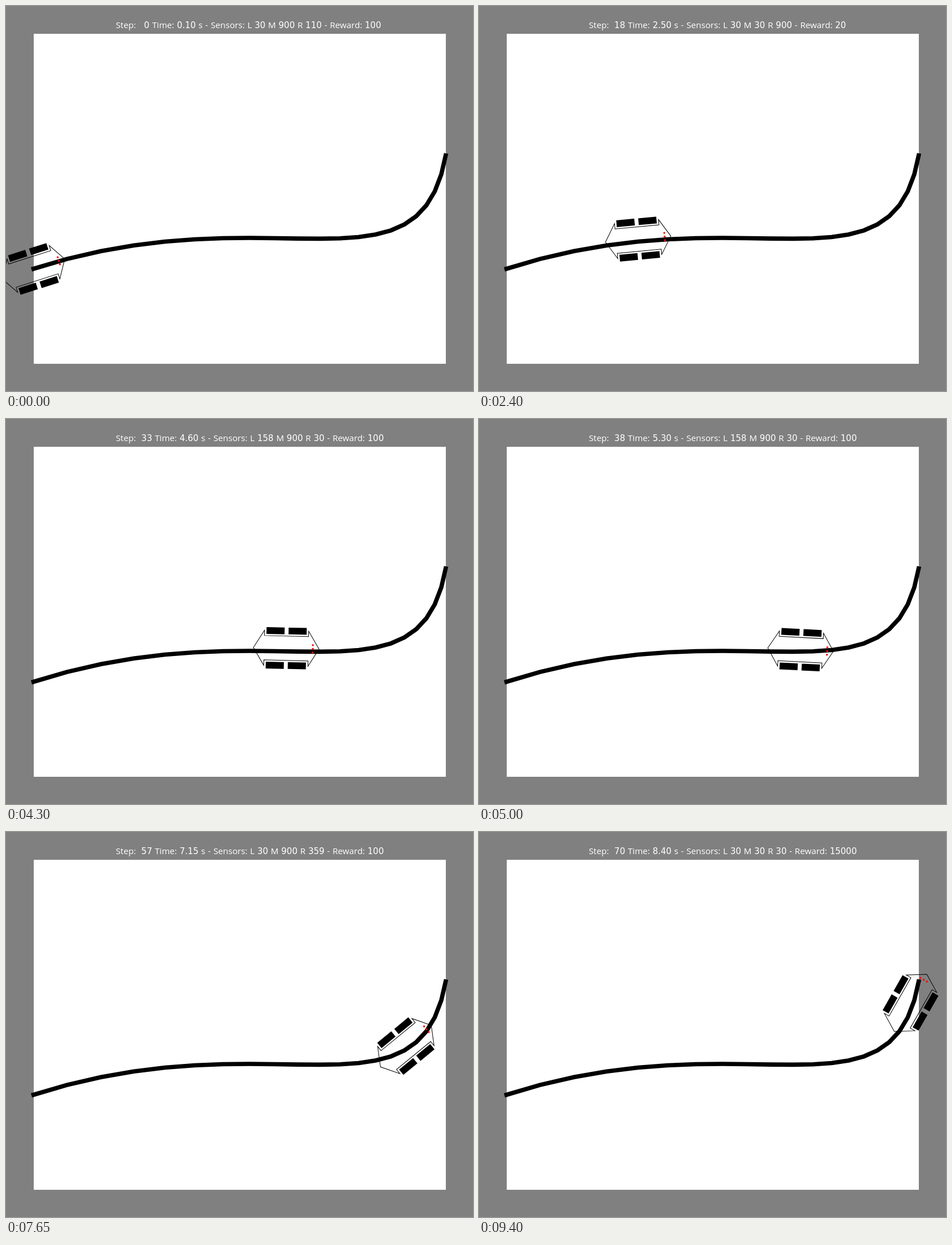
Animation, 825 px wide and 679 px high, one loop 9550 ms. Source, as an HTML page with a canvas:

```html
<!DOCTYPE html>
<html lang="en">
<head>
<meta charset="utf-8">
<title>Line follower</title>
<style>
  html, body { margin: 0; height: 100%; overflow: hidden; background: #808080; }
  canvas { display: block; }
</style>
</head>
<body>
<canvas id="stage" width="825" height="679"></canvas>
<script>
const ctx = document.getElementById('stage').getContext('2d');
const LAST = 70, LOOP = 9550, TRACK_PARTS = 20;
const WORD_FONT = '15.2px "Open Sans", "Noto Sans", sans-serif';
const NUMBER_FONT = '15px "DejaVu Sans", sans-serif';

// Key points of the drive; heading in degrees, clock in simulated seconds.
const drive = [
  { step: 0, x: 48.5, y: 463.7, heading: -17.7, clock: 0.1, seen: [30, 900, 110] },
  { step: 10, x: 170.4, y: 426.2, heading: -9.7, clock: 1.4, seen: [30, 30, 900] },
  { step: 26, x: 392.6, y: 404.4, heading: -1, clock: 3.6, seen: [30, 30, 900] },
  { step: 38, x: 568.1, y: 406.8, heading: 3, clock: 5.3, seen: [158, 900, 30] },
  { step: 48, x: 663.2, y: 397.8, heading: -14.1, clock: 6.4, seen: [900, 226, 30] },
  { step: 57, x: 706.4, y: 377.6, heading: -39.3, clock: 7.15, seen: [30, 900, 359] },
  { step: 70, x: 762.4, y: 301.4, heading: -60.3, clock: 8.4, seen: [30, 30, 30] },
];

const radians = degrees => degrees * Math.PI / 180;
const mix = (a, b, u) => a + (b - a) * u;
const bezier = (a, b, c, d, u) => {
  const v = 1 - u;
  return a * v ** 3 + 3 * b * v * v * u + 3 * c * v * u * u + d * u ** 3;
};

const track = Array.from({ length: TRACK_PARTS + 1 }, (_, i) => {
  const u = i / TRACK_PARTS;
  return [bezier(45, 472, 732, 777.5, u), bezier(464.5, 325.4, 527.4, 260, u)];
});

// One side of the hull, from tail to nose; the other side mirrors it.
const flank = [[-58, 0], [-39, -31], [-39, -21.5], [39, -21.5], [39, -31]];
const hull = [...flank, ...flank.map(([x, y]) => [-x, -y])];

// Quick steps last 100 ms, the others 150 ms.
function isQuick(step) {
  if (step < 8) return step % 4 === 0;
  if (step < 35) return step > 10 && step % 2 === 1;
  return (step > 43 && step < 48) || step > 65;
}

function stepAt(t) {
  let step = 0;
  while (step < LAST && (t -= isQuick(step) ? 100 : 150) >= 0) step++;
  return step;
}

// Between key points the car leaves and arrives along its heading.
function stateAt(step) {
  const i = Math.max(1, drive.findIndex(key => key.step >= step));
  const a = drive[i - 1], b = drive[i];
  const u = (step - a.step) / (b.step - a.step);
  const reach = Math.hypot(b.x - a.x, b.y - a.y) / 3;
  const along = (axis, turn) => bezier(
    a[axis], a[axis] + reach * turn(radians(a.heading)),
    b[axis] - reach * turn(radians(b.heading)), b[axis], u);
  return {
    x: along('x', Math.cos),
    y: along('y', Math.sin),
    heading: mix(a.heading, b.heading, u),
    clock: Math.round(mix(a.clock, b.clock, u) * 20) / 20,
    seen: u < 0.5 ? a.seen : b.seen,
  };
}

function polyline(points) {
  ctx.beginPath();
  points.forEach(([x, y]) => ctx.lineTo(x, y));
}

function box(x, y, w, h, color) {
  ctx.fillStyle = color;
  ctx.fillRect(x - w / 2, y - h / 2, w, h);
}

function drawCar({ x, y, heading }) {
  ctx.save();
  ctx.translate(x, y);
  ctx.rotate(radians(heading));
  for (const side of [-1, 1]) {
    for (const end of [-1, 1]) box(end * 19.5, side * 30.5, 32, 12, '#000');
  }
  polyline(hull);
  ctx.closePath();
  ctx.lineWidth = 1;
  ctx.stroke();
  for (const side of [-1, 0, 1]) box(47, side * 6.5, 3, 3, '#f00');
  ctx.restore();
}

function drawStatus(step, { clock, seen: [left, middle, right] }) {
  const reward = step === LAST ? 15000 : middle === 900 ? 100 : 20;
  const text = `Step: ${String(step).padStart(3)} Time: ${clock.toFixed(2)} s - ` +
    `Sensors: L ${left} M ${middle} R ${right} - Reward: ${reward}`;
  ctx.fillStyle = '#fff';
  let x = 194;
  for (const run of text.match(/[\d. ]+|[^\d. ]+/g)) {
    ctx.font = /[\d ]/.test(run) ? NUMBER_FONT : WORD_FONT;
    ctx.fillText(run, x, 39);
    x += ctx.measureText(run).width;
  }
}

function draw(now) {
  const step = stepAt(now % LOOP);
  const state = stateAt(step);
  ctx.fillStyle = '#808080';
  ctx.fillRect(0, 0, 825, 679);
  ctx.fillStyle = '#fff';
  ctx.fillRect(49, 49, 728, 582);
  ctx.strokeStyle = '#000';
  ctx.lineWidth = 7.6;
  polyline(track);
  ctx.stroke();
  drawCar(state);
  drawStatus(step, state);
}

const start = performance.now();
function tick() {
  draw(performance.now() - start);
  requestAnimationFrame(tick);
}
tick();
</script>
</body>
</html>
```
